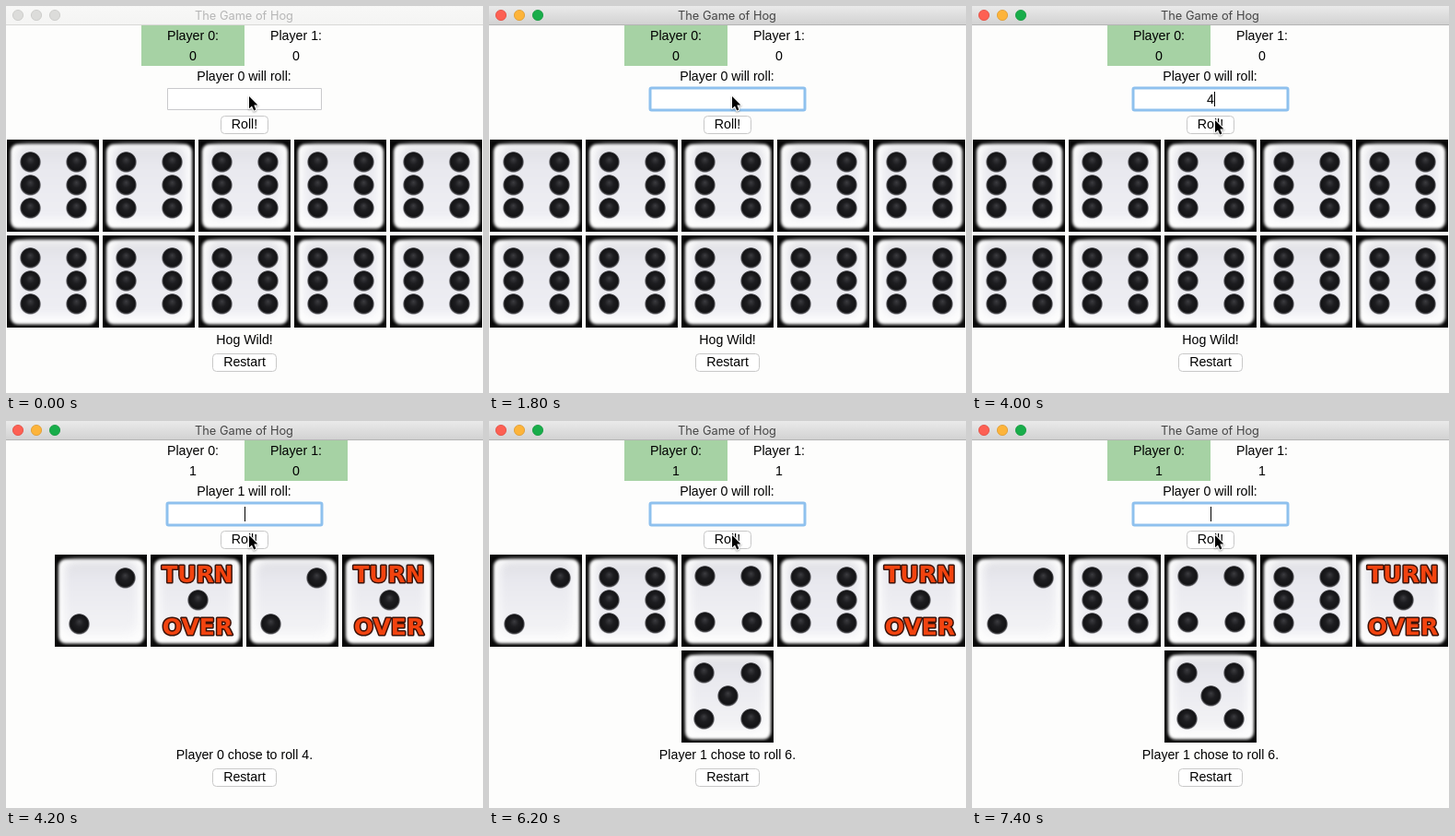
An HTML page with a canvas for the animation above (8000 ms loop, 518 by 420 pixels).

```html
<!DOCTYPE html>
<html lang="en">
<head>
<meta charset="utf-8">
<title>The Game of Hog</title>
<style>
  html, body { margin: 0; width: 518px; height: 420px; overflow: hidden; background: #fdfdfc; }
  canvas { display: block; }
</style>
</head>
<body>
<canvas id="stage" width="518" height="420"></canvas>
<script>
const ctx = document.getElementById('stage').getContext('2d');
const LOOP = 8000;
const PAPER = '#fdfdfc';
const BODY_FONT = '14.2px "Liberation Sans", Arial, sans-serif';
const DIE = 100, PITCH = 104;

const PIPS = {
  1: [[51, 49]],
  2: [[76, 25], [26, 75]],
  4: [[25, 23], [75, 23], [25, 73], [76, 73]],
  5: [[24, 24], [75, 24], [50, 49], [24, 74], [75, 74]],
  6: [[25, 24], [75, 24], [25, 49], [75, 49], [25, 74], [75, 74]]
};

const TURNS = [
  { from: 0, player: 0, scores: [0, 0], dice: Array(10).fill(6), note: 'Hog Wild!' },
  { from: 4200, player: 1, scores: [1, 0], dice: [2, 1, 2, 1], note: 'Player 0 chose to roll 4.' },
  { from: 6200, player: 0, scores: [1, 1], dice: [2, 6, 4, 6, 1, 5], note: 'Player 1 chose to roll 6.' }
];

// [start, end] spans in which the text caret is lit
const CARET = [[400, 1000], [1200, 1800], [2200, 2800], [3000, 3600], [4000, 6200], [6600, 7200], [7400, LOOP]];
const POINTER = [
  { from: 0, x: 264, y: 98 },
  { from: 2600, x: 268, y: 119 },
  { from: 2800, x: 273, y: 125 },
  { from: 3200, x: 264, y: 124 }
];

const latest = (list, t) => list.filter(item => item.from <= t).pop();

function roundRect(c, x, y, w, h, r) {
  c.beginPath();
  c.roundRect(x, y, w, h, r);
}

function label(text, x, y, color = '#000', font = BODY_FONT) {
  ctx.font = font;
  ctx.textAlign = 'center';
  ctx.fillStyle = color;
  ctx.fillText(text, x, y);
}

function drawPip(c, x, y) {
  const shade = c.createRadialGradient(x, y - 3, 0, x, y, 11.8);
  shade.addColorStop(0, '#3c3c40');
  shade.addColorStop(0.4, '#1d1d20');
  shade.addColorStop(0.8, '#131315');
  shade.addColorStop(0.9, '#4c4c50');
  shade.addColorStop(1, 'rgba(150, 150, 156, 0)');
  c.fillStyle = shade;
  c.beginPath();
  c.arc(x, y, 11.8, 0, Math.PI * 2);
  c.fill();
}

function drawWord(c, word, y) {
  c.font = 'bold 25px "DejaVu Sans", sans-serif';
  c.textAlign = 'center';
  c.lineJoin = 'round';
  c.lineWidth = 3;
  c.strokeStyle = '#3a1208';
  c.strokeText(word, 51, y);
  c.fillStyle = '#f2430f';
  c.fillText(word, 51, y);
}

function makeDie(face) {
  const tile = document.createElement('canvas');
  tile.width = tile.height = DIE;
  const c = tile.getContext('2d');
  c.fillStyle = '#080808';
  c.fillRect(0, 0, DIE, DIE);

  c.filter = 'blur(1.6px)';
  c.fillStyle = '#fdfdfd';
  roundRect(c, 4, 5, 93, 91.5, 8);
  c.fill();
  c.filter = 'blur(4px)';
  const tone = c.createLinearGradient(0, 5, 0, 88);
  tone.addColorStop(0, '#dedee2');
  tone.addColorStop(0.25, '#e8e8ee');
  tone.addColorStop(1, face === 6 ? '#efeff4' : '#f4f4f6');
  c.fillStyle = tone;
  roundRect(c, 10, 7, 80, 80, 12);
  c.fill();
  c.filter = 'none';

  PIPS[face].forEach(([x, y]) => drawPip(c, x + 0.5, y + 0.5));
  if (face === 1) {
    drawWord(c, 'TURN', 30);
    drawWord(c, 'OVER', 87);
  }
  return tile;
}

const tiles = {};
for (const face in PIPS) tiles[face] = makeDie(+face);

function drawDice(dice) {
  for (let row = 0; row * 5 < dice.length; row++) {
    const line = dice.slice(row * 5, row * 5 + 5);
    const left = 259 - (line.length * PITCH - 4) / 2;
    line.forEach((face, i) => ctx.drawImage(tiles[face], left + i * PITCH, 145 + row * PITCH));
  }
}

function drawTitleBar(active) {
  const bar = ctx.createLinearGradient(0, 0, 0, 20);
  bar.addColorStop(0, active ? '#eaeaea' : '#f8f8f7');
  bar.addColorStop(1, active ? '#d2d2d2' : '#f4f4f3');
  ctx.fillStyle = bar;
  ctx.fillRect(0, 0, 518, 20);
  ctx.fillStyle = active ? '#b4b4b4' : '#d8d8d6';
  ctx.fillRect(0, 20, 518, 1);

  const lights = active
    ? [['#fd6053', '#e2493e'], ['#fdb43a', '#dd9a2c'], ['#18ad4a', '#12983d']]
    : Array(3).fill(['#dcdcda', '#c8c8c6']);
  lights.forEach(([fill, rim], i) => {
    ctx.beginPath();
    ctx.arc(13 + i * 20, 10, 5.6, 0, Math.PI * 2);
    ctx.fillStyle = fill;
    ctx.fill();
    ctx.lineWidth = 0.8;
    ctx.strokeStyle = rim;
    ctx.stroke();
  });
  label('The Game of Hog', 258.5, 15, active ? '#464646' : '#b6b6b6', '12.8px Inter, sans-serif');
}

function drawButton(text, x, y, w) {
  roundRect(ctx, x + 0.5, y + 0.5, w - 1, 19, 4);
  ctx.fillStyle = '#fff';
  ctx.fill();
  ctx.lineWidth = 1;
  ctx.strokeStyle = '#c8c8c8';
  ctx.stroke();
  label(text, x + w / 2, y + 14);
}

function drawEntry(text, focused, caretOn) {
  ctx.fillStyle = '#fff';
  ctx.fillRect(175, 89, 168, 24);
  ctx.lineWidth = 1;
  ctx.strokeStyle = '#c9c9cc';
  ctx.strokeRect(175.5, 89.5, 167, 23);
  if (focused) {
    ctx.lineWidth = 3;
    ctx.strokeStyle = '#8fc1ee';
    roundRect(ctx, 175, 89, 168, 24, 1.5);
    ctx.stroke();
  }
  if (text) label(text, 259, 106);
  if (caretOn) {
    ctx.fillStyle = '#000';
    ctx.fillRect(text ? 263 : 259, 93, 1, 16);
  }
}

function drawPointer({ x, y }) {
  const outline = [[0, 0], [0, 13.2], [3, 10.5], [5.2, 15.6], [7.4, 14.6], [5.3, 9.6], [9.4, 9.6]];
  ctx.beginPath();
  outline.forEach(([dx, dy]) => ctx.lineTo(x + dx, y + dy));
  ctx.closePath();
  ctx.lineJoin = 'round';
  ctx.lineWidth = 2;
  ctx.strokeStyle = '#fff';
  ctx.save();
  ctx.shadowColor = 'rgba(0, 0, 0, 0.35)';
  ctx.shadowBlur = 2;
  ctx.shadowOffsetY = 1;
  ctx.stroke();
  ctx.restore();
  ctx.fillStyle = '#000';
  ctx.fill();
}

function draw(t) {
  const turn = latest(TURNS, t);
  const active = t >= 400;
  ctx.fillStyle = PAPER;
  ctx.fillRect(0, 0, 518, 420);
  drawTitleBar(active);

  ctx.fillStyle = '#a6d2a4';
  ctx.fillRect(147 + turn.player * 112, 21, 112, 44);
  turn.scores.forEach((score, i) => {
    label(`Player ${i}:`, 203 + i * 112, 37);
    label(score, 203 + i * 112, 59);
  });
  label(`Player ${turn.player} will roll:`, 258.5, 81);

  const typed = t >= 2400 && t < 4200 ? '4' : '';
  drawEntry(typed, active, CARET.some(([on, off]) => t >= on && t < off));
  drawButton('Roll!', 233, 119, 52);
  drawDice(turn.dice);
  label(turn.note, 259, 367);
  drawButton('Restart', 224, 377, 70);
  drawPointer(latest(POINTER, t));
}

const start = performance.now();
function tick() {
  draw((performance.now() - start) % LOOP);
  requestAnimationFrame(tick);
}
tick();
</script>
</body>
</html>
```
